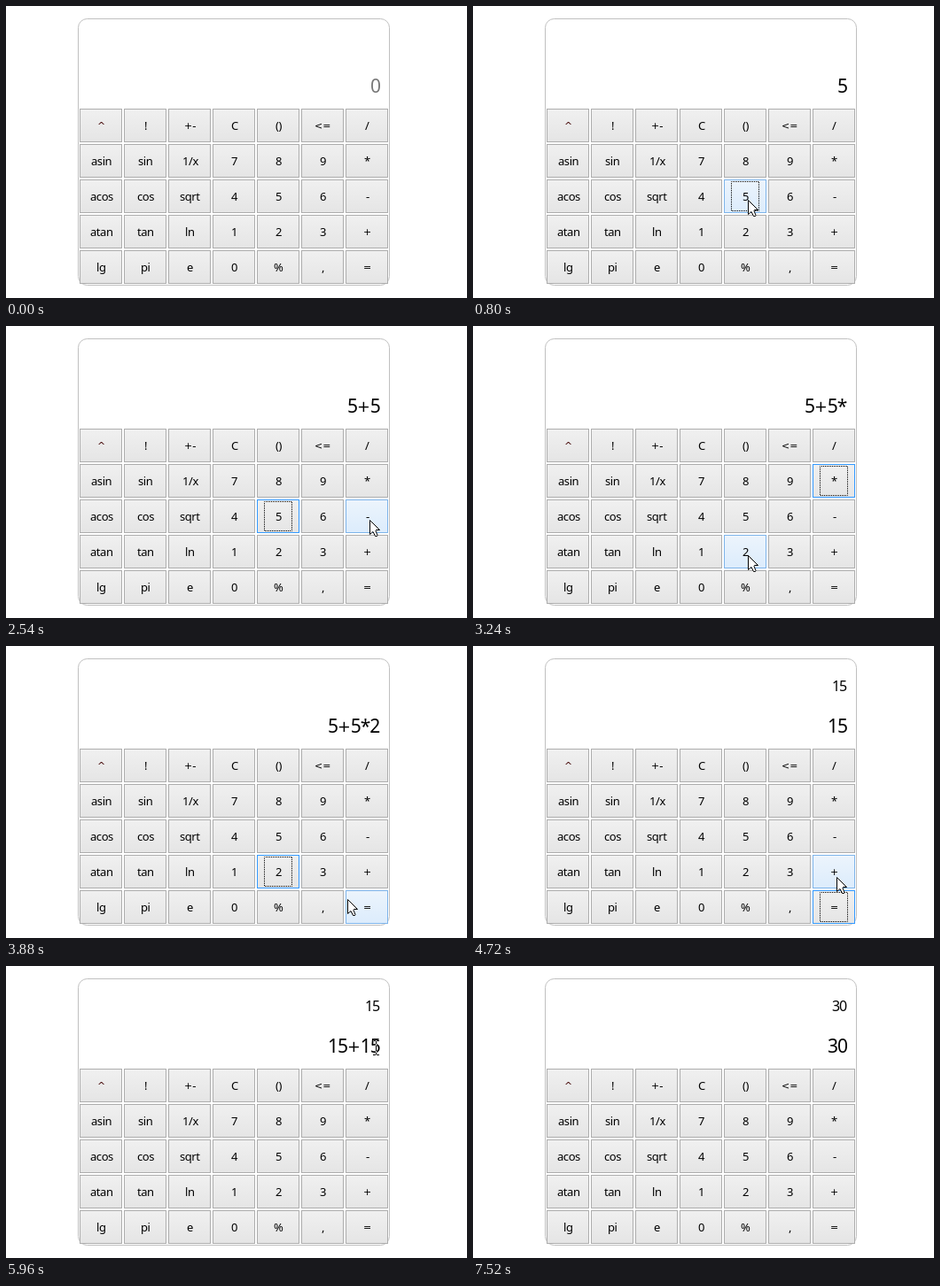
An HTML page with a canvas for the animation above (7.62 s loop, 520 px wide and 330 px high).

```html
<!DOCTYPE html>
<html lang="en">
<head>
<meta charset="utf-8">
<title>Calculator</title>
<style>
html, body { margin: 0; width: 100%; height: 100%; overflow: hidden; background: #fff; }
canvas { display: block; }
</style>
</head>
<body>
<canvas id="stage" width="520" height="330"></canvas>
<script>
const ctx = document.getElementById('stage').getContext('2d');
const LOOP = 7620, CURSOR_IN = 20, CURSOR_OUT = 6750, RESET = 7520;
const HOVER_LAG = 40, HOLD = 40, W = 48, H = 38;

const ROWS = [
  '^ ! +- C () <= /',
  'asin sin 1/x 7 8 9 *',
  'acos cos sqrt 4 5 6 -',
  'atan tan ln 1 2 3 +',
  'lg pi e 0 % , ='
];
const buttons = ROWS.flatMap((row, j) => row.split(' ').map((label, i) =>
  ({ label, x: 83 + 50 * i, y: 116 + 40 * j })));

// Centre of everything the cursor can visit.
const spots = { past: [411, 42], show: [414, 88] };
for (const b of buttons) spots[b.label] = [b.x + W / 2, b.y + H / 2];

const LOOK = {
  normal: ['#adadad', '#f0f0f0', '#e5e5e5'],
  focus: ['#3399ff', '#f0f0f0', '#e5e5e5'],
  hover: ['#7eb4ea', '#ecf4fc', '#dcecfc'],
  press: ['#569de5', '#daecfc', '#c4e0fc']
};

// Each move: start, end, spot and an optional offset from its centre.
const MOVES = [
  [20, 460, '5'], [960, 1240, '+'], [1380, 1700, '5'],
  [2140, 2460, '-'], [2560, 2700, '*'], [2940, 3300, '2'],
  [3640, 3840, '=', -22, -9], [3920, 4080, '='], [4620, 4780, '+'],
  [5020, 5140, '-', -17], [5280, 5380, 'past'], [5660, 5800, 'show'],
  [5960, 6260, '=']
];
const CLICKS = [600, 1260, 1740, 2760, 3340, 4180, 4900, 5520, 6400];

const easeOut = u => 1 - (1 - u) ** 3;

function cursorAt(t) {
  let x = 398, y = 330, spot = '';
  for (const [from, to, name, dx = 3, dy = 4] of MOVES) {
    if (t < from) break;
    const k = easeOut(Math.min(1, (t - from) / (to - from)));
    x += (spots[name][0] + dx - x) * k;
    y += (spots[name][1] + dy - y) * k;
    spot = name;
  }
  return { x: Math.round(x), y: Math.round(y), spot };
}

const evaluate = text => String(text.split('+')
  .map(term => term.split('*').reduce((a, b) => a * b, 1))
  .reduce((a, b) => a + b, 0));

function stateAt(t) {
  const s = { focus: '', press: '', text: '', past: '' };
  for (const down of CLICKS) {
    if (t < down) break;
    s.focus = cursorAt(down).spot;
    if (t < down + HOLD) s.press = s.focus;
    else if (s.focus === '=') s.text = s.past = evaluate(s.text);
    else s.text += s.focus === 'past' ? s.past : s.focus;
  }
  if (t >= RESET) s.focus = '';
  return s;
}

// Math signs use a broader face; digits advance by whole pixels.
function drawText(text, x, y, size, align, color) {
  const runs = text.split(/([+<=^]+)/).filter(Boolean).map(str => {
    const math = /[+<=^]/.test(str);
    return {
      str,
      font: math ? `${size * 0.84}px "DejaVu Sans", sans-serif` : `${size}px "Noto Sans", sans-serif`,
      gap: math ? '0px' : `${Math.round(size * 0.52) - size * 0.572}px`,
      lift: math ? size * 0.05 : 0
    };
  });
  const use = r => { ctx.font = r.font; ctx.letterSpacing = r.gap; };
  let total = 0;
  for (const r of runs) {
    use(r);
    r.w = ctx.measureText(r.str).width;
    total += r.w;
  }
  let left = Math.round(x - total * align);
  ctx.fillStyle = color;
  for (const r of runs) {
    use(r);
    ctx.fillText(r.str, left, y - r.lift);
    left += r.w;
  }
}

function drawButton({ label, x, y }, look, focused) {
  const [border, top, bottom] = LOOK[look];
  const fill = ctx.createLinearGradient(0, y + 1, 0, y + H - 1);
  fill.addColorStop(0, top);
  fill.addColorStop(1, bottom);
  ctx.fillStyle = fill;
  ctx.fillRect(x, y, W, H);
  ctx.strokeStyle = border;
  ctx.strokeRect(x + 0.5, y + 0.5, W - 1, H - 1);
  if (focused) {
    ctx.setLineDash([1, 1]);
    ctx.lineDashOffset = 0.5;
    ctx.strokeStyle = '#000';
    ctx.strokeRect(x + 8.5, y + 2.5, W - 17, H - 5);
    ctx.setLineDash([]);
  }
  drawText(label, x + 24.5, y + 24, 13, 0.5, label === '^' ? '#400000' : '#000');
}

function drawArrow(x, y) {
  const pts = [[0, 0], [0, 16], [3.5, 13], [6, 18], [8, 18], [8.5, 17], [6.5, 12], [7, 11], [11, 11]];
  ctx.beginPath();
  for (const [dx, dy] of pts) ctx.lineTo(x + dx + 0.5, y + dy + 0.5);
  ctx.closePath();
  ctx.fillStyle = '#fff';
  ctx.fill();
  ctx.strokeStyle = '#000';
  ctx.stroke();
}

function drawBeam(x, y) {
  ctx.globalCompositeOperation = 'difference';
  ctx.fillStyle = '#fff';
  ctx.fillRect(x, y - 7, 1, 15);
  for (const dy of [-8, 8]) {
    ctx.fillRect(x - 3, y + dy, 3, 1);
    ctx.fillRect(x + 1, y + dy, 3, 1);
  }
  ctx.globalCompositeOperation = 'source-over';
}

function draw(t) {
  const s = stateAt(t);
  const tip = cursorAt(t - HOVER_LAG);
  const hit = b => t < RESET && tip.x >= b.x && tip.x < b.x + W && tip.y >= b.y && tip.y < b.y + H;

  ctx.fillStyle = '#fff';
  ctx.fillRect(0, 0, 520, 330);
  ctx.lineWidth = 1;
  ctx.strokeStyle = '#c0c0c0';
  ctx.beginPath();
  ctx.roundRect(81.5, 14.5, 351, 301, 10);
  ctx.stroke();

  drawText(s.past, 421.5, 51, 16, 1, '#000');
  drawText(s.text || '0', 421.5, 98, 21, 1, s.text ? '#000' : '#787878');

  for (const b of buttons) {
    const focused = b.label === s.focus;
    const look = b.label === s.press ? 'press' : hit(b) ? 'hover' : focused ? 'focus' : 'normal';
    drawButton(b, look, focused);
  }

  if (t >= CURSOR_IN && t < CURSOR_OUT) {
    const { x, y } = cursorAt(t);
    (y < 115 ? drawBeam : drawArrow)(x, y);
  }
}

const start = performance.now();
function tick() {
  const t = (performance.now() - start) % LOOP;
  draw(Math.floor(t / 20) * 20);
  requestAnimationFrame(tick);
}
tick();
</script>
</body>
</html>
```
